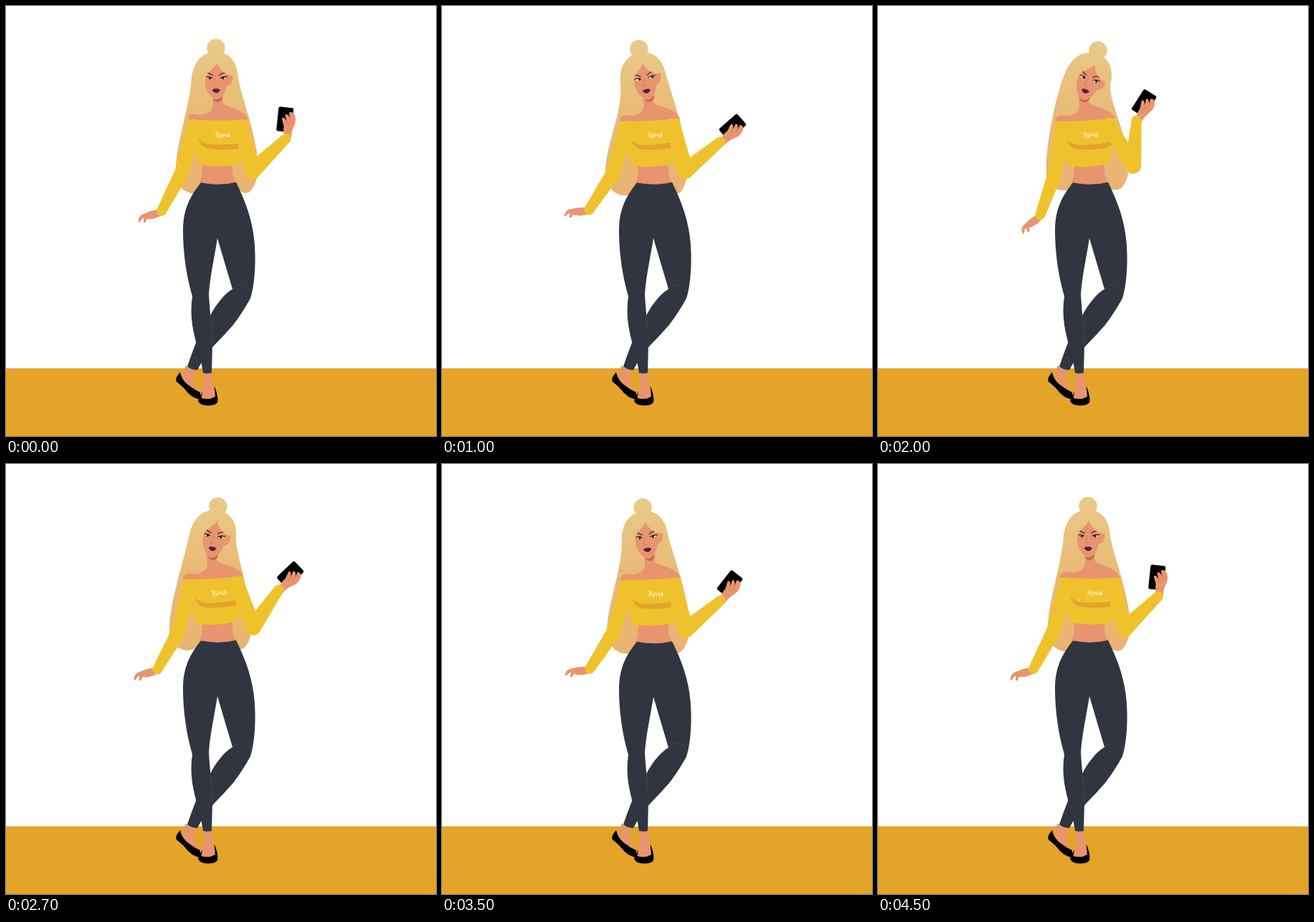
Write an HTML page that moves like this. It is 600x600 px and loops after 4900 ms.

```html
<!DOCTYPE html>
<html lang="ru">
<head>
<meta charset="utf-8">
<style>
  html, body { margin: 0; width: 100%; height: 100%; overflow: hidden; background: #fff; }
  svg { display: block; width: 100vw; height: 100vh; }
  text { font: 9.5px "Open Sans", "Noto Sans", sans-serif; fill: #fff; text-anchor: middle; }
  .skin { fill: #e8946f; }
  .top { fill: #efc22d; }
  .pants { fill: #30353f; }
  .line { fill: none; stroke-linecap: round; }
</style>
</head>
<body>
<svg viewBox="0 0 600 600">
  <defs>
    <linearGradient id="blond" gradientUnits="userSpaceOnUse" x1="0" y1="46" x2="0" y2="264">
      <stop offset="0" stop-color="#e9ca8a"/>
      <stop offset=".25" stop-color="#e8c27d"/>
      <stop offset=".48" stop-color="#e9ba77"/>
      <stop offset="1" stop-color="#e9b273"/>
    </linearGradient>
  </defs>
  <rect y="505.5" width="600" height="94.5" fill="#e4a429"/>

  <!-- feet -->
  <path class="skin" d="M250 502L266 507Q260 513 262 522Q265 534 272 541L258 534L246 516Q249 510 250 502Z"/>
  <path d="M243 511Q245 520 251 526Q261 535 271 539L271 549Q262 548 254 540Q247 531 239 525Q234 521 243 511Z"/>
  <path class="skin" d="M276.500 510H287.500L288.500 528L293.500 546Q283 551 272 548L275.500 530Z"/>
  <path d="M274 538L272.500 547Q283 550.500 292 545L290.500 530Q295.500 541 295.500 551Q295 557 283 557.500Q271 558 268 551Q270 545 274 538Z"/>

  <g id="upperBack">
    <path id="hair" fill="url(#blond)"/>
    <path class="skin" d="M273 212C275 233 273 240 269 251H323C316 240 315 230 316 212Z"/>
  </g>

  <g id="legs" class="pants">
    <path d="M295 324L316 395C304 402 292 418 285 432C276 450 269 460 265 470Q258 488 253 503Q260 508 267 508Q276 490 290 474Q303 461 317 445Q330 428 341 408C347 390 348 362 347.500 345C347 310 338 280 321 246L290 255Z"/>
    <path d="M272 246.500Q297 251.500 321 246L322 262L295 324C291 350 285 375 283 402C284 425 288 450 288 472L287 512Q281 513.500 275 512C272 490 264 470 260 445Q257 425 260 405C252 378 247 345 247 313C247 285 256 266 272 246.500Z"/>
    <path class="line" stroke="#464a54" stroke-width=".7" d="M316 395Q323 387 332 389Q340 392 342 402M285 432Q288 450 288 473"/>
  </g>

  <g id="upper">
    <g id="torso">
      <path class="skin" d="M254 159Q253 151 262 150.500C272 153 288 152 289 138L288 122H302V134C306 142 333 143 338 159Q296 163 254 159Z"/>
      <path class="top" d="M254 158.500Q296 161 338 158.500C340 185 328 200 327 221Q297 227 267 221C266 200 250 185 254 158.500Z"/>
      <path fill="#e2a52b" d="M268 184Q274 193 290 193.500Q315 194 335 190Q333 198 318 200Q298 202 281 199Q271 196 268 184Z"/>
      <text x="302" y="183">Зуна</text>
    </g>
    <path id="handL" class="skin" d="M219 285L207 287C200 288 196 291 190 293C186 295 184 300 185 304C187 305 188 299 192 298L192 304C196 306 195 300 197 299C204 300 212 298 220 292Z"/>
    <g id="handR">
      <rect x="379" y="141.500" width="21" height="34" rx="2.500" transform="rotate(6 389.500 158.500)"/>
      <path class="skin" d="M387 186C390 179 386 174 388 168L385 157C387 154 390 157 392 161L389.500 152C393 150 396 154 397 158L395 149.500C399 146 402 150 403 152C405 157 405 163 402 168Q398 176 398 186Z"/>
      <path class="line" stroke="#c9734f" stroke-width=".7" d="M392 161L394 167M397 158L398 163"/>
    </g>
    <path id="armL" class="top"/>
    <path id="armR" class="top"/>

    <g id="head">
      <ellipse cx="293" cy="58.500" rx="12.700" ry="12.500" fill="url(#blond)"/>
      <path fill="#c5684a" d="M289 122H302V129Q297 137 290 132Z"/>
      <path class="skin" d="M294 79C290 89 279 91 278 104C277 117 286 128 293 131C301 130 306 121 308 112C314 111 318 103 316 97C306 97 299 90 294 79Z"/>
      <path class="line" stroke="#cf7c58" stroke-width="1" d="M292 101Q291 106 289.500 110Q291 112 294 111"/>
      <path class="line" stroke="#6f3526" stroke-width="1.600" d="M282 93.500L288 96.500M298 96.500Q301 93.500 304.500 93.500"/>
      <g id="open">
        <path fill="#f4e9e2" d="M280.500 100Q284 98.500 287.500 101Q284 103.500 280.500 100ZM299 101Q303 98.500 307.500 100Q304 103.500 299 101Z"/>
        <g id="iris" fill="#26302b"><circle cx="284.300" cy="100.800" r="1.800"/><circle cx="302.800" cy="100.800" r="1.800"/></g>
        <path class="line" stroke="#17120f" stroke-width="1.100" d="M279.500 99Q284 98 287.500 100.500M299 100.500Q303 98 308.500 98.800"/>
      </g>
      <path id="shut" class="line" stroke="#17120f" stroke-width="1.300" d="M279.500 100.500Q284 99.500 287.500 102.500M299 102.500Q302 99 308 100.500"/>
      <path fill="#5a1a45" d="M287.500 117.500Q290.500 114.500 293 115.500Q296 114.500 299 117.500Q296 121.500 293 121.500Q290 121 287.500 117.500Z"/>
    </g>
  </g>
</svg>
<script>
const el = id => document.getElementById(id);
const set = (id, name, value) => el(id).setAttribute(name, value);

// Arm keys: rest, out, in, out, rest
const swing = [450, 1200, 1250, 2150, 3050, 3150, 4250];
const arm = (rest, out, inner) =>
  [rest, out, out, inner, out, out, rest].map((v, i) => [swing[i], v]);

const tracks = {
  elbowLX: arm(245, 236, 247),
  elbowLY: arm(233, 236, 236),
  wristLX: arm(217, 203, 228),
  wristLY: arm(286, 284, 292),
  handL: arm(0, 14, -24),
  elbowRX: arm(344, 338.5, 357),
  elbowRY: arm(230, 230, 222),
  foreR: arm(-44, -38.7, -88.9),
  lenR: arm(65, 63.5, 63),
  phone: [[450, 0], [1150, 48], [1250, 48], [2150, 25], [3050, 48], [3150, 48], [4050, 0]],
  torso: [[450, 0], [1150, -3.5], [3150, -3.5], [4100, 0]],
  headX: [[300, 294], [1100, 289.2], [2100, 284.5], [3200, 288], [4200, 294]],
  head: [[300, 0], [1150, -11], [2100, 18.5], [3400, -6], [3700, -6], [4350, 0]],
  hair: [[450, 0], [1150, -10], [2100, -2], [2750, -9], [3150, -10], [4000, 0]],
  bob: [[0, 0], [500, 2.5], [1000, 0], [3200, 0], [3750, 2.5], [4400, 0]],
  gaze: [[600, 0], [1000, 2], [1500, 2], [2200, 1], [2700, 0]]
};

function at(keys, t) {
  if (t <= keys[0][0]) return keys[0][1];
  for (let i = 1; i < keys.length; i++) {
    const [t0, a] = keys[i - 1], [t1, b] = keys[i];
    if (t <= t1) return a + (b - a) * (1 - Math.cos(Math.PI * (t - t0) / (t1 - t0))) / 2;
  }
  return keys[keys.length - 1][1];
}

function turn([x, y], [cx, cy], deg) {
  const r = deg * Math.PI / 180, c = Math.cos(r), s = Math.sin(r);
  return [cx + (x - cx) * c - (y - cy) * s, cy + (x - cx) * s + (y - cy) * c];
}

// Tapered piece with round ends
function taper([ax, ay], ra, [bx, by], rb) {
  const d = Math.hypot(bx - ax, by - ay), nx = (ay - by) / d, ny = (bx - ax) / d;
  return `M${ax + nx * ra} ${ay + ny * ra}L${bx + nx * rb} ${by + ny * rb}` +
    `A${rb} ${rb} 0 0 0 ${bx - nx * rb} ${by - ny * rb}` +
    `L${ax - nx * ra} ${ay - ny * ra}A${ra} ${ra} 0 0 0 ${ax + nx * ra} ${ay + ny * ra}Z`;
}

const sleeve = (shoulder, elbow, wrist, r) =>
  taper(shoulder, 10, elbow, r) + taper(elbow, r, wrist, 7);

function hairPath(p) {
  const h = (x, y) => {
    const [a, b] = turn([x, y], [294, 135.5], p.head);
    return `${a + p.headX - 294} ${b} `;
  };
  const low = (x, y) => `${x + p.hair} ${y} `;
  const end = 262 - p.head * 0.25;
  return `M${h(258.5, 105)}C${h(260, 80)}${h(272, 64)}${h(293, 64)}` +
    `C${h(312, 64)}${h(322, 78)}${h(323.5, 96)}` +
    `C${h(325, 118)}${low(347, 170)}${low(351.5, 215)}` +
    `C${low(354, 240)}${low(345, end)}${low(333, end - 1)}` +
    `C318 257 310 240 312 213L276 213C276 240 275 ${end - 4} ${low(265, end)}` +
    `C${low(250, end)}${low(238, 252)}${low(237, 235)}` +
    `C${low(235, 200)}${h(256, 140)}${h(258.5, 105)}Z`;
}

function draw(t) {
  const p = {};
  for (const name in tracks) p[name] = at(tracks[name], t);

  const hip = [296, 270];
  const wristL = [p.wristLX, p.wristLY], elbowR = [p.elbowRX, p.elbowRY];
  const wristR = turn([p.elbowRX + p.lenR, p.elbowRY], elbowR, p.foreR);
  const shift = `translate(0 ${p.bob})`;

  set('upper', 'transform', shift);
  set('upperBack', 'transform', shift);
  set('legs', 'transform', `translate(0 512) scale(1 ${1 - p.bob / 264}) translate(0 -512)`);
  set('torso', 'transform', `rotate(${p.torso} ${hip})`);
  set('hair', 'd', hairPath(p));
  set('head', 'transform', `translate(${p.headX - 294} 0) rotate(${p.head} 294 135.5)`);
  set('iris', 'transform', `translate(${p.gaze} ${-p.gaze / 4})`);

  set('armL', 'd', sleeve(turn([262.5, 168], hip, p.torso), [p.elbowLX, p.elbowLY], wristL, 10));
  set('armR', 'd', sleeve(turn([328, 168], hip, p.torso), elbowR, wristR, 11.5));
  set('handL', 'transform', `translate(${wristL}) rotate(${p.handL}) translate(-217 -288)`);
  set('handR', 'transform', `translate(${wristR}) rotate(${p.phone}) translate(-391 -185)`);

  const blink = t >= 3700 && t <= 3900;
  set('open', 'visibility', blink ? 'hidden' : 'visible');
  set('shut', 'visibility', blink ? 'visible' : 'hidden');
}

const start = performance.now();
function tick() {
  const t = (performance.now() - start) % 4900;
  draw(Math.min(4500, Math.floor(t / 100) * 100));
  requestAnimationFrame(tick);
}
tick();
</script>
</body>
</html>
```
